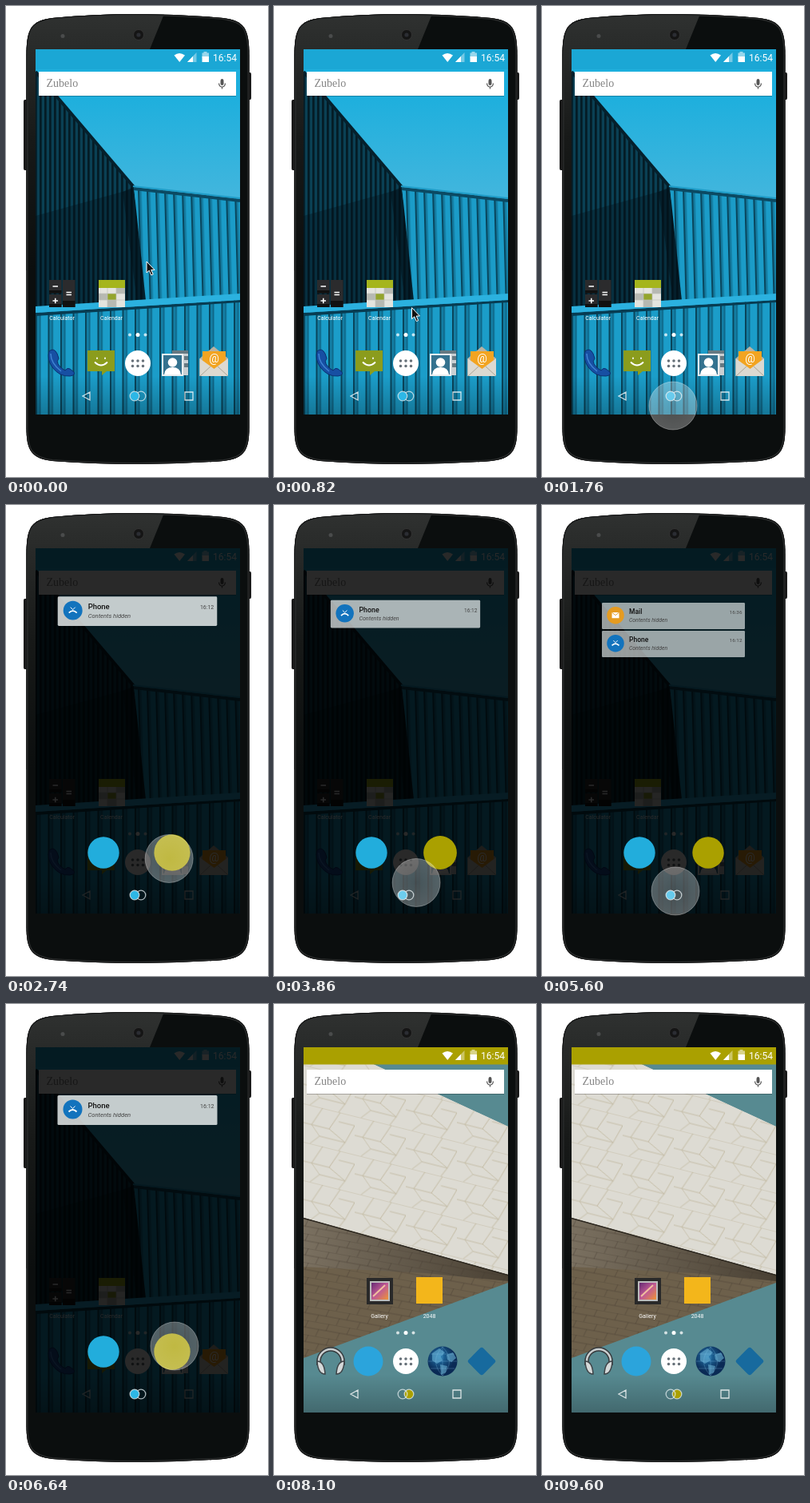
Animation of 328 by 588 pixels, one loop 9620 ms. Source, as an HTML page:

```html
<!DOCTYPE html>
<html lang="en">
<head>
<meta charset="utf-8">
<title>Profile switch</title>
<style>
html, body { margin: 0; width: 100%; height: 100%; overflow: hidden; background: #fff; }
svg { display: block; width: 328px; height: 588px; }
text { font-family: Roboto, "Open Sans", sans-serif; }
.label { font-size: 7px; fill: #fff; text-anchor: middle; }
</style>
</head>
<body>
<svg id="stage" viewBox="0 0 328 588">
<defs>
  <clipPath id="screen"><path d="M37 54H293V510H37Z"/></clipPath>
  <clipPath id="body"><path id="shell" d="M25.500 62C25.500 26 33 18.500 58 15Q165 5 272 15C297 18.500 304.500 26 304.500 62V526C304.500 555 298 565 272 568Q165 576 58 568C32 565 25.500 555 25.500 526Z"/></clipPath>
  <linearGradient id="gloss" x2="0" y2="1"><stop stop-color="#303231"/><stop offset=".5" stop-color="#171918"/><stop offset="1" stop-color="#0b0e0e"/></linearGradient>
  <linearGradient id="sky" x2="0" y2="1"><stop offset=".3" stop-color="#1dafdd"/><stop offset="1" stop-color="#43b6dd"/></linearGradient>
  <linearGradient id="soffit"><stop stop-color="#7a7060"/><stop offset="1" stop-color="#4a4134"/></linearGradient>
  <linearGradient id="navShade" x2="0" y2="1"><stop stop-color="#000" stop-opacity="0"/><stop offset="1" stop-color="#000" stop-opacity=".24"/></linearGradient>
  <linearGradient id="photo" x2="1" y2="1"><stop stop-color="#5d246f"/><stop offset=".5" stop-color="#c05a94"/><stop offset="1" stop-color="#f39a2c"/></linearGradient>
  <radialGradient id="touchFill"><stop stop-color="#fff" stop-opacity=".26"/><stop offset="1" stop-color="#fff" stop-opacity=".32"/></radialGradient>
  <radialGradient id="globe" cx=".4" cy=".35"><stop stop-color="#2479b0"/><stop offset="1" stop-color="#0a2a55"/></radialGradient>
  <pattern id="darkRibs" width="6" height="20" patternUnits="userSpaceOnUse">
    <path fill="#0a4054" d="M0 0H6V20H0Z"/><path fill="#041c26" d="M0 0H2.8V20H0Z"/>
  </pattern>
  <pattern id="ribs" width="11" height="20" patternUnits="userSpaceOnUse" patternTransform="translate(5) skewX(1.5)">
    <path fill="#1b9cc8" d="M0 0H11V20H0Z"/><path fill="#09465d" d="M0 0H2V20H0Z"/><path fill="#13789c" d="M2 0H4.500V20H2Z"/>
  </pattern>
  <pattern id="wideRibs" width="15.500" height="20" patternUnits="userSpaceOnUse" patternTransform="translate(6)">
    <path fill="#1b9dc9" d="M0 0H15.500V20H0Z"/><path fill="#084359" d="M0 0H2V20H0Z"/><path fill="#137da3" d="M2 0H5V20H2Z"/><path fill="#0b5875" d="M5 0H6.300V20H5Z"/>
  </pattern>
  <pattern id="tiles" width="64" height="48" patternUnits="userSpaceOnUse" patternTransform="translate(37 76) skewY(14)">
    <path fill="none" stroke="#bfb69c" stroke-width=".8" d="M0 0H64M0 24H32M44 12H64M20 36H52M10 24L24 0M32 24L46 0M52 36L64 12M8 48L20 36L10 24M32 24L52 36L44 48"/>
  </pattern>
  <pattern id="bricks" width="26" height="18" patternUnits="userSpaceOnUse" patternTransform="translate(37 268) skewY(10)">
    <path fill="none" stroke="#40372b" stroke-opacity=".5" stroke-width=".8" d="M0 0H26M0 9H26M6 0L2 9M19 9L15 18"/>
  </pattern>
</defs>

<path fill="#1b1b1b" d="M26 117H23.5Q22 117 22 119V203Q22 205 23.5 205H26ZM304 83H305.5Q307 83 307 85V115Q307 117 305.5 117H304Z"/>
<use href="#shell" fill="#0b0e0e"/>
<g clip-path="url(#body)">
  <path fill="url(#gloss)" d="M20 5H200L180 54H37V330H20Z"/>
  <use href="#shell" fill="none" stroke="#2c2e2e" stroke-width="4"/>
  <use href="#shell" fill="none" stroke="#111" stroke-width="1.600"/>
</g>
<circle cx="166" cy="36" r="6.500" fill="#151515" stroke="#343434"/>
<circle cx="166" cy="36" r="2.600" fill="#2b2d33"/>
<circle cx="71" cy="37.500" r="2.500" fill="#4a4c4c"/>

<g clip-path="url(#screen)">
  <g id="homeA">
    <path fill="url(#sky)" d="M37 54H293V242H37Z"/>
    <path fill="url(#darkRibs)" d="M37 82L160 226L176 368L37 382Z"/>
    <path fill="#021018" fill-opacity=".35" d="M160 228L37 262V382L176 368Z"/>
    <path fill="#021018" fill-opacity=".5" d="M146 232L160 226L176 368H164Z"/>
    <path fill="none" stroke="#05202c" stroke-width="4" d="M37 82L160 226"/>
    <path fill="url(#ribs)" d="M160 226L293 241V364L175 368Z"/>
    <path fill="none" stroke="#0b4a63" stroke-width="4" d="M160 228L293 243"/>
    <path fill="none" stroke="#1f9dc8" stroke-width="2" d="M159 225L293 240"/>
    <path fill="url(#wideRibs)" d="M37 378L293 362V510H37Z"/>
    <path fill="#073c52" d="M37 383L293 367V370L37 387Z"/>
    <path fill="#2bb1df" d="M37 375L293 359V367L37 383Z"/>
    <path fill="#1ba7d5" d="M37 54H293V79H37Z"/>
    <g id="calculator">
      <path fill="#2b2b2d" d="M54 342H69.500V358.500H54ZM71 342H86.500V376H71ZM54 360H69.500V376H54Z"/>
      <path fill="#111" d="M54 355H69.500V358.500H54ZM71 368H86.500V376H71ZM54 372H69.500V376H54Z"/>
      <path stroke="#fff" stroke-width="1.500" d="M58.500 350H65M58.500 368H65M61.750 364.700V371.300M75.500 357.500H82M75.500 360.500H82"/>
    </g>
    <g id="calendar">
      <path fill="#e4e4de" d="M116 342H149V376H116Z"/>
      <path fill="#a5b51c" d="M116 342H149V352H116Z"/>
      <path fill="#b7b9b2" d="M116 359H127V367H116ZM138 352H149V359H138ZM127 367H138V376H127Z"/>
      <path fill="#94a52c" d="M127 359H138V367H127Z"/>
      <path fill="none" stroke="#bfc0ba" stroke-width=".7" d="M116 359H149M116 367H149M127 352V376M138 352V376"/>
    </g>
    <text class="label" x="70" y="391.500">Calculator</text>
    <text class="label" x="132" y="391.500">Calendar</text>
    <path id="handset" fill="#174fa3" stroke="#0b2f70" d="M54 431Q60 426 64 434L66 440Q63 443 65 447Q69 453 74 455Q77 451 80 453L85 457Q87 461 80 462Q67 463 58 451Q51 441 54 431Z"/>
    <path fill="none" stroke="#3f83d2" stroke-width="1.500" d="M56 434Q56 446 69 456"/>
    <path fill="#8b9c1d" d="M102 430H136V456H126L120 461V456H102Z"/>
    <path fill="none" stroke="#fff" stroke-width="1.800" stroke-linecap="round" d="M111.500 445Q119 452 126.500 445M114 439.500V440M124 439.500V440"/>
    <g id="contacts">
      <path fill="#c9d0d3" d="M208 430H228V461H208Z"/>
      <path fill="#667982" d="M208 430H228V434H208ZM223 437H228V442H223ZM223 446H228V451H223Z"/>
      <path fill="#e9edef" d="M195 434H222V462H195Z"/>
      <path fill="#34728f" d="M197 436H220V460H197Z"/>
      <circle cx="208.500" cy="445" r="5.800" fill="#fff"/>
      <path fill="#fff" d="M198 460Q199 451 208.500 451T219 460Z"/>
    </g>
    <g id="mail">
      <path fill="#b9b2a2" d="M242.500 440L260 425L278 440V462H242.500Z"/>
      <path fill="#f2a421" d="M246 431H275V443L260.500 454L246 443Z"/>
      <text x="260.500" y="445" font-size="14" fill="#fff" text-anchor="middle">@</text>
      <path fill="#dcd9d1" d="M242.500 440L260.500 453L278 440V462H242.500Z"/>
      <path fill="none" stroke="#aaa598" d="M243 462L256 450M278 462L265 450"/>
    </g>
  </g>

  <g id="homeB">
    <path fill="#578a91" d="M37 54H293V510H37Z"/>
    <path id="facade" fill="#dddbd3" d="M37 75H124L293 153V338L37 267Z"/>
    <use href="#facade" style="fill:url(#tiles)"/>
    <path fill="url(#tiles)" d="M37 75H124L293 153V338L37 267Z"/>
    <path fill="#6d604b" d="M37 267L293 338V348L37 442Z"/>
    <path fill="url(#soffit)" d="M37 267L293 338V346L190 336L37 328Z"/>
    <path fill="url(#bricks)" d="M37 267L293 338V348L37 442Z"/>
    <path stroke="#2d2820" stroke-width="1.500" d="M37 267.500L293 338.500"/>
    <path fill="#aaa000" d="M37 54H293V75.500H37Z"/>
    <path fill="#292929" d="M116 342H149V375H116Z"/>
    <path fill="url(#photo)" stroke="#bcbcbc" stroke-width="2" d="M121 347H144V370H121Z"/>
    <path stroke="#ffd9a0" stroke-width="2" stroke-opacity=".8" d="M124 365L139 351"/>
    <path fill="#f3b61b" d="M178 341H211V374H178Z"/>
    <text class="label" x="132" y="391.500">Gallery</text>
    <text class="label" x="194.500" y="391.500">2048</text>
    <path fill="none" stroke="#35393c" stroke-width="5.500" d="M56 451V446A15 15 0 0 1 86 446V451"/>
    <path fill="none" stroke="#c9cecf" stroke-width="2.500" d="M56 449V446A15 15 0 0 1 86 446V449"/>
    <path fill="#d5d9d9" stroke="#3e4448" stroke-width="1.500" d="M54 446Q63 446 64 462Q55 462 54 446ZM88 446Q79 446 78 462Q87 462 88 446Z"/>
    <circle cx="118" cy="446" r="18.500" fill="#2ba4dc"/>
    <circle cx="211" cy="446" r="18.500" fill="url(#globe)"/>
    <path fill="#69b3d6" fill-opacity=".6" d="M198 436L207 430L214 435L209 440L211 445L204 449L198 445ZM216 438L224 435L228 442L222 447L217 444ZM208 450L217 452L215 460L209 463Z"/>
    <path fill="none" stroke="#86c7e7" stroke-opacity=".4" stroke-width=".7" d="M193 446H229M211 428V464M196 437H226M196 455H226M211 428Q194 446 211 464Q228 446 211 428"/>
    <rect x="247" y="433" width="26" height="26" rx="3" fill="#176a9e" transform="rotate(45 260 446)"/>
  </g>

  <path fill="url(#navShade)" d="M37 462H293V510H37Z"/>
  <path fill="#fff" d="M41 82H288V112H41Z"/>
  <path fill="#000" fill-opacity=".25" d="M41 112H288V113H41Z"/>
  <text x="50.500" y="101" font-size="14" fill="#858585" style="font-family:'Liberation Serif',serif">Zubelo</text>
  <path fill="#555" d="M268.500 94Q268.500 91 270.500 91T272.500 94V97Q272.500 99 270.500 99T268.500 97Z"/>
  <path fill="none" stroke="#555" stroke-width="1.200" d="M266.500 96.500Q267 101 270.500 101T274.500 96.500M270.500 101V103.500"/>
  <g fill="#fff">
    <path d="M210.500 61.500Q217 56.500 224 61.500L217.250 70Z"/>
    <path fill-opacity=".4" d="M227 70H238.500V58Z"/>
    <path d="M227 70H234V62.700Z"/>
    <path fill-opacity=".55" d="M247.500 57H251.500V58.500H254V64H245.500V58.500H247.500Z"/>
    <path d="M245.500 63H254V70H245.500Z"/>
    <text x="289" y="68.500" font-size="12" text-anchor="end">16:54</text>
    <circle cx="155" cy="410.500" r="2" fill-opacity=".75"/>
    <circle cx="165" cy="410.500" r="2.500"/>
    <circle cx="174.500" cy="410.500" r="2" fill-opacity=".75"/>
    <circle cx="165" cy="446" r="16"/>
  </g>
  <path stroke="#667078" stroke-width="3.600" stroke-linecap="round" stroke-dasharray="0 6.500" d="M158.500 443H172M158.500 449.500H172"/>
  <path fill="none" stroke="#fff" stroke-opacity=".8" stroke-width="1.300" d="M105 482V492L96 487ZM224 482H234V492H224Z"/>
  <path id="dim" d="M37 54H293V510H37Z"/>
  <g id="cards"></g>
</g>

<g id="picks">
  <circle id="pickA" fill="#22addc"/>
  <circle id="pickB" fill="#aaa000"/>
</g>
<g id="homeKey" stroke="#e4eef0" stroke-opacity=".75" stroke-width="1.300">
  <circle id="keyB" cx="169" cy="487" r="5.800"/>
  <circle id="keyA" cx="161" cy="487" r="5.800"/>
</g>
<circle id="touch" r="30" fill="url(#touchFill)" stroke="#fff" stroke-opacity=".3"/>
<path id="cursor" fill="#111" stroke="#fff" d="M0 0V14L3.300 11.200L5.800 17L8.200 16L5.700 10.400H10Z"/>
</svg>
<script>
const LOOP = 9620;
const $ = id => document.getElementById(id);
const clamp = v => Math.max(0, Math.min(1, v));
const smooth = v => v * v * (3 - 2 * v);
const mix = (a, b, k) => a + (b - a) * k;
const ramp = (t, from, to) => smooth(clamp((t - from) / (to - from)));
const set = (el, attrs) => { for (const k in attrs) el.setAttribute(k, attrs[k]); };

// Position on a path of [time, x, y] points
function along(path, t) {
  let i = 0;
  while (i < path.length - 2 && t >= path[i + 1][0]) i++;
  const [t0, x0, y0] = path[i], [t1, x1, y1] = path[i + 1];
  const k = ramp(t, t0, t1);
  return [mix(x0, x1, k), mix(y0, y1, k)];
}

const cursorIn = [[500, 176, 319], [1350, 165, 499]];
const cursorOut = [[7550, 211, 427], [8080, 345, 405]];
const drag = [
  [2250, 164, 499], [2850, 208, 436], [3500, 208, 436], [4070, 165, 487],
  [4350, 165, 487], [4800, 122, 434], [5150, 122, 434], [5580, 167, 482],
  [5850, 167, 482], [6500, 211, 427], [7000, 211, 427]
];

const glyphs = {
  Mail: '<path fill="#fff" d="M-5-4H5V4H-5Z"/><path fill="none" stroke="#e59b20" d="M-5-4L0 0L5-4"/>',
  Phone: '<path fill="none" stroke="#fff" stroke-width="1.800" d="M-5 3Q0-2 5 3"/><path fill="none" stroke="#fff" d="M-3-4L0-1L3-4"/>'
};

function addCard(name, time, color) {
  $('cards').insertAdjacentHTML('beforeend', `<g>
    <rect width="200" height="37" rx="1.500" fill="#f4f8f8"/>
    <g transform="translate(19 17.500)"><circle r="12" fill="${color}"/>${glyphs[name]}</g>
    <text x="38" y="16" font-size="9.500" font-weight="500" fill="#111">${name}</text>
    <text x="38" y="27" font-size="7.600" font-style="italic" fill="#444">Contents hidden</text>
    <text x="196" y="16" font-size="7" fill="#444" text-anchor="end">${time}</text></g>`);
  const card = $('cards').lastElementChild;
  return { card, back: card.firstElementChild };
}
const mail = addCard('Mail', '16:36', '#e59b20');
const phone = addCard('Phone', '16:12', '#1273bd');

function placeCard({ card, back }, focus, away, slot, shown) {
  const s = mix(.895, 1, focus);
  const y = mix(122 + slot * 35, 114, focus);
  set(card, { transform: `translate(${164.500 - 100 * s} ${y}) scale(${s})`, opacity: shown * (1 - away) });
  set(back, { 'fill-opacity': mix(.62, .8, focus) });
}

function placePick(el, x, focus, open) {
  set(el, { cx: mix(165, x, open), cy: mix(487, 434, open), r: mix(4, 19.700, open) + 3 * focus });
}

function draw(t) {
  const open = ramp(t, 1900, 2200) * (1 - ramp(t, 7000, 7350));
  const switched = t >= 7000;
  const [x, y] = along(drag, t);
  const pull = v => Math.sin(clamp(v / 43) * Math.PI / 2);
  const left = pull(163 - x), right = pull(x - 167);

  set($('homeA'), { visibility: switched ? 'hidden' : 'visible' });
  set($('homeB'), { visibility: switched ? 'visible' : 'hidden' });
  set($('dim'), { opacity: .84 * open });

  placeCard(mail, left, clamp(right * 4), 0, open);
  placeCard(phone, right, clamp(left * 4), 1 - clamp(right * 4), open);

  placePick($('pickA'), 122, left, open);
  placePick($('pickB'), 208, right, open);
  set($('picks'), { opacity: open });
  set($('keyA'), { fill: switched ? 'none' : '#2db7e6' });
  set($('keyB'), { fill: switched ? '#aaa000' : 'none' });

  const press = ramp(t, 1350, 1550) * (1 - ramp(t, 7000, 7200));
  set($('touch'), { cx: x, cy: y, opacity: press });

  const early = t < 1400;
  const [cx, cy] = along(early ? cursorIn : cursorOut, t);
  set($('cursor'), {
    transform: `translate(${cx} ${cy})`,
    visibility: early || (t > 7100 && t < 8080) ? 'visible' : 'hidden'
  });
}

const start = performance.now();
function tick(now) {
  draw(Math.max(0, now - start) % LOOP);
  requestAnimationFrame(tick);
}
draw(0);
requestAnimationFrame(tick);
</script>
</body>
</html>
```
